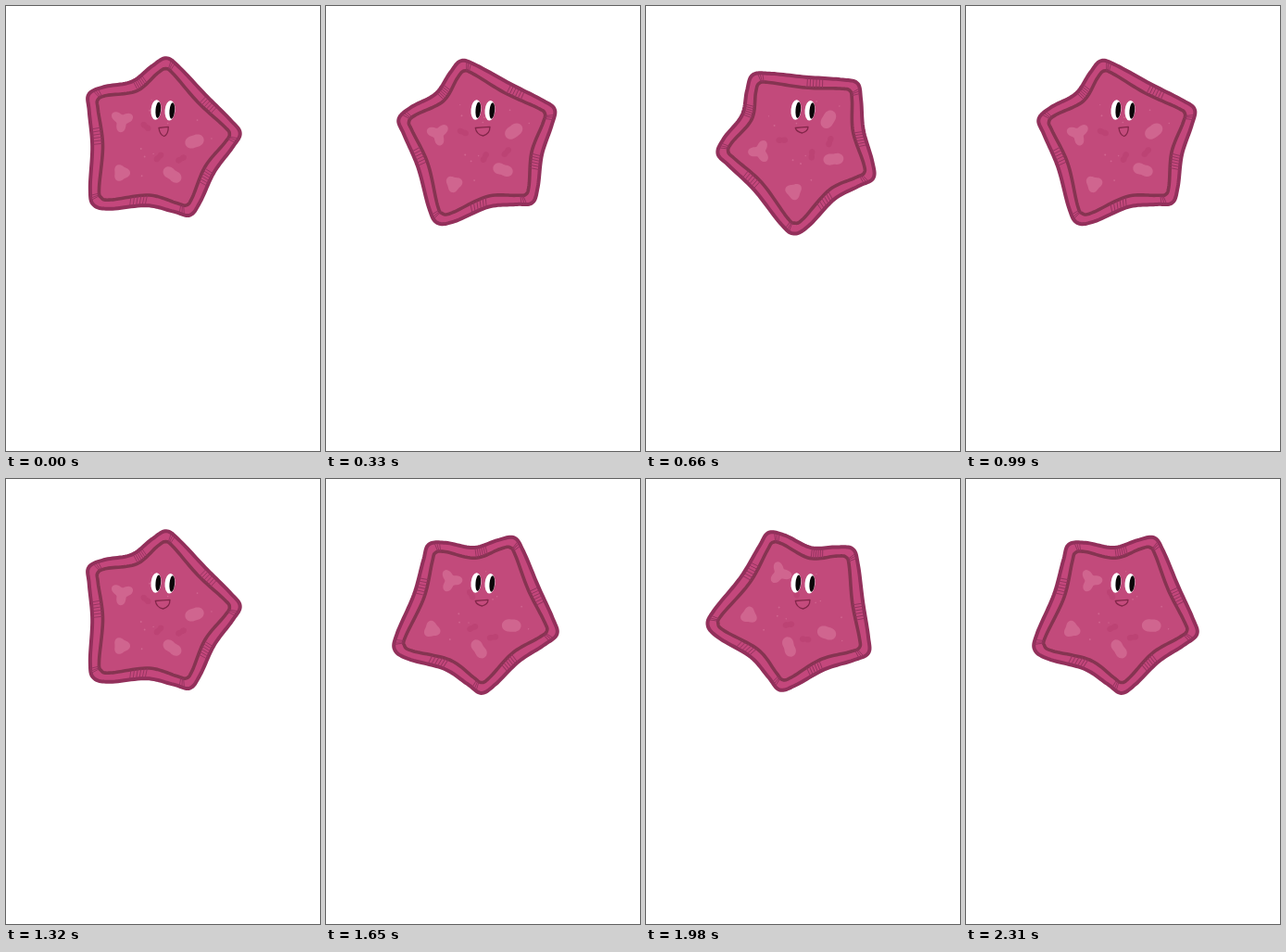
An HTML page for the animation above (2.64 s loop, 339 by 480 pixels).

```html
<!DOCTYPE html>
<html lang="en">
<head>
<meta charset="utf-8">
<title>Rocking starfish</title>
<style>
html, body { margin: 0; width: 100%; height: 100%; overflow: hidden; background: #fff; }
svg { display: block; width: 100%; height: 100%; }
</style>
</head>
<body>
<svg viewBox="0 0 339 480">
  <g id="star"></g>
  <g id="face"></g>
</svg>
<script>
const STEP = 330, CX = 168.5, CY = 143;
const star = document.getElementById('star');
const face = document.getElementById('face');

function add(parent, tag, attrs) {
  const el = document.createElementNS('http://www.w3.org/2000/svg', tag);
  for (const key in attrs) el.setAttribute(key, attrs[key]);
  parent.append(el);
  return el;
}

const polar = (deg, r, [x, y] = [CX, CY]) =>
  [x + r * Math.cos(deg * Math.PI / 180), y + r * Math.sin(deg * Math.PI / 180)];

// Arms: direction in degrees and reach
const arms = [[-87, 88.5], [-4, 86], [70, 89.5], [136, 104.5], [211, 94]];

// Per arm: shoulder, tip, shoulder, then the valley halfway to the next arm.
function ring(inset, tipRadius) {
  return arms.flatMap(([dir, reach], i) => {
    const [next, nextReach] = arms[(i + 1) % arms.length];
    const gap = (next - dir + 360) % 360;
    const hub = polar(dir, reach - inset - tipRadius);
    const tip = [-65, 0, 65].map(turn => polar(dir + turn, tipRadius, hub));
    return [...tip, polar(dir + gap / 2, .39 * (reach + nextReach) - inset)];
  });
}

// Point on the smooth closed curve through pts; u counts points.
function at(pts, u) {
  const i = Math.floor(u), t = u - i;
  const [a, b, c, d] = [-1, 0, 1, 2].map(k => pts[(i + k + pts.length) % pts.length]);
  return [0, 1].map(k => b[k] + t / 2 * (c[k] - a[k] +
    t * (2 * a[k] - 5 * b[k] + 4 * c[k] - d[k] + t * (3 * (b[k] - c[k]) + d[k] - a[k]))));
}

const closed = pts => `M${pts.join('L')}Z`;
const smooth = pts => closed(Array.from({ length: pts.length * 12 }, (_, i) => at(pts, i / 12)));

const rim = ring(1.6, 17), pad = ring(13, 10);
add(star, 'path', { d: smooth(rim), fill: '#c4477c', stroke: '#92305b', 'stroke-width': 4 });
add(star, 'path', { d: smooth(pad), fill: '#c24a7b', stroke: '#853451', 'stroke-width': 3.6 });

// Ridges cross the rim just after every tip and every valley.
function ridges(from, count, gap) {
  let d = '';
  for (let i = 0; i < count; i++) d += `M${at(rim, from + i * gap)}L${at(pad, from + i * gap)}`;
  add(star, 'path', { d, stroke: '#94345f', 'stroke-width': .9 });
}
arms.forEach((_, i) => {
  ridges(4 * i + 1.4, 3, .15);
  ridges(4 * i + 3.05, 6, .08);
});

// Soft patch whose radius swells once per lobe
function patch(x, y, size, lobes, swell, tilt, fill) {
  const pts = Array.from({ length: 48 }, (_, i) =>
    polar(tilt + i * 7.5, size * (1 + swell * Math.cos(lobes * i * Math.PI / 24)), [x, y]));
  add(star, 'path', { d: closed(pts), fill });
}
const PALE = '#d0658f', DUSKY = '#bc4374';
patch(125, 123.5, 9.5, 3, .35, 97, PALE);
patch(124.5, 180, 8.3, 3, .15, 0, PALE);
patch(179.5, 182, 8.3, 2, .32, 36, PALE);
patch(203.5, 146, 8.5, 2, .22, -18, PALE);
patch(151, 130, 4.5, 2, .4, 40, DUSKY);
patch(165, 163, 4.5, 2, .4, -45, DUSKY);
patch(189, 165, 4.5, 2, .4, -30, DUSKY);

let seed = 7;
const random = () => (seed = seed * 16807 % 2147483647) / 2147483647;
for (let i = 0; i < 13; i++) {
  const [cx, cy] = polar(360 * random(), 12 + 45 * random());
  add(star, 'circle', { cx, cy, r: .6 + .4 * random(), fill: PALE });
}

for (const x of [162, 177]) {
  const y = 112 + (x - 162) / 20, transform = `rotate(5 ${x} ${y})`;
  add(face, 'ellipse', { cx: x, cy: y, rx: 5.5, ry: 10.8, fill: '#fff', transform });
  add(face, 'ellipse', { cx: x + 2.3, cy: y, rx: 2.8, ry: 8.8, fill: '#0b0508', transform });
}

const mouth = add(face, 'path', { fill: '#c54b7d', stroke: '#822649', 'stroke-width': 1.3, 'stroke-linejoin': 'round' });
function lips(left, right, chin) {
  const mid = (left + right) / 2;
  return `M${left} 131.5Q${mid} 130.5 ${right} 130.3Q${right} ${chin - 2} ${mid + .5} ${chin}Q${left + 1} ${chin - 1.5} ${left} 131.5Z`;
}
const small = lips(165, 175.3, 140.5), wide = lips(161.3, 177, 140), flat = lips(161.3, 175, 137);

// Tilt and mouth of each held pose
const poses = [
  [0, small], [-18, wide], [-41, flat], [-18, small],
  [0, wide], [20.5, flat], [36, wide], [20.5, flat]
];

function draw(now) {
  const [tilt, shape] = poses[Math.floor(now / STEP) % poses.length];
  star.setAttribute('transform', `rotate(${tilt} ${CX} ${CY})`);
  mouth.setAttribute('d', shape);
}

let start;
function tick(now) {
  start ??= now;
  draw(now - start);
  requestAnimationFrame(tick);
}
draw(0);
requestAnimationFrame(tick);
</script>
</body>
</html>
```
